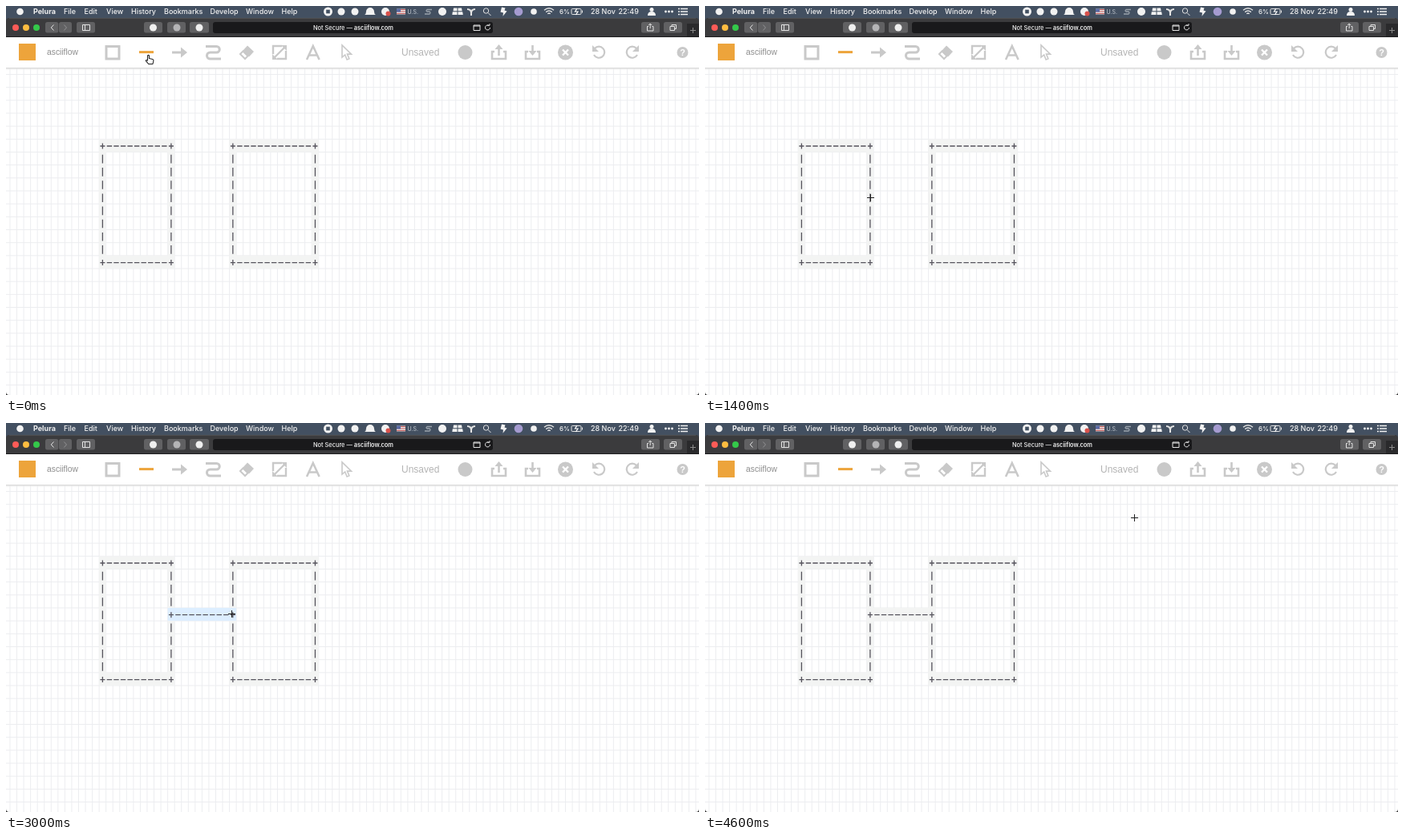
Animation, 864 px wide and 486 px high, one loop 4.8 s. Source, as an HTML page:

```html
<!DOCTYPE html>
<html lang="en">
<head>
<meta charset="utf-8">
<title>ASCII line drawing</title>
<style>
html, body { margin: 0; width: 100%; height: 100%; overflow: hidden; background: #fff; }
svg { display: block; width: 864px; height: 486px; }
.ui { font: 500 9px Inter, Roboto, sans-serif; fill: #f2f2f2; }
.page { font-family: "Liberation Sans", Arial, sans-serif; }
.icon { fill: none; stroke: #c9c9c9; stroke-width: 3; }
.solid { fill: #c9c9c9; stroke: none; }
.thin { fill: none; stroke: #e4e4e4; stroke-width: 1; }
.button { fill: #616163; }
</style>
</head>
<body>
<svg viewBox="0 0 864 486">
  <defs>
    <linearGradient id="shade" x2="0" y2="1">
      <stop stop-color="#cfcfcf"/><stop offset="1" stop-color="#fff" stop-opacity="0"/>
    </linearGradient>
  </defs>
  <rect width="864" height="486" fill="#fff"/>
  <path id="grid" stroke="#ecedf0" fill="none"/>
  <path id="cells" fill="#f3f4f3"/>
  <rect id="selection" fill="#def"/>
  <path id="glyphs" stroke="#55535c" stroke-width="1.3" fill="none"/>

  <!-- page toolbar -->
  <rect y="38" width="864" height="39" fill="#fff"/>
  <rect y="77" width="864" height="4" fill="url(#shade)"/>
  <g class="page">
    <rect x="16" y="47" width="21" height="21" fill="#eda43b"/>
    <text x="51" y="61.3" font-size="10.3" fill="#8d8d8d">asciiflow</text>
    <text x="493" y="62.3" font-size="12" fill="#b4b4b4">Unsaved</text>
  </g>
  <path d="M166 57.6h18" stroke="#eda43b" stroke-width="3"/>
  <g class="icon">
    <rect x="125" y="50.5" width="16" height="15.5"/>
    <path d="M207 58h13"/>
    <path d="M249 50.5h13.5a3.75 3.75 0 0 1 0 7.5h-8a4 4 0 0 0 0 8h13.5"/>
    <path d="M292 60l6 6l3.5-3.5l-6-6z" stroke-width="2"/>
    <path class="solid" d="M295 56l6-6.5l8 7.5l-6 6.5z"/>
    <path d="M333 60V50h11M349 56v10h-11M334 65l14-14" stroke-width="2.4"/>
    <path class="solid" d="M343 49h7v7zM332 60v7h7zM218 51.5l8 6.5l-8 6.5z"/>
    <path d="M375 67l7.8-17l7.8 17M378 61.5h10" stroke-width="2.6"/>
    <path d="M419 49v15l3.7-3l2.4 6l2.8-1.1l-2.4-5.8h5z" stroke-width="1.6"/>
    <circle class="solid" cx="572.5" cy="58" r="9"/>
    <path d="M609 57h-3v9h17v-9h-3M614.5 62v-9M651 57h-3v9h17v-9h-3M656.5 49v8" stroke-width="2.6"/>
    <path class="solid" d="M609.5 54l5-6l5 6zM651.5 56l5 6l5-6z"/>
    <circle class="solid" cx="697.5" cy="58" r="9.5"/>
    <path d="M694 54.5l7 7m0-7l-7 7" stroke="#fff" stroke-width="2.3"/>
    <path d="M734 53a7 7 0 1 1-1 8M786 53a7 7 0 1 0 1 8" stroke-width="2.2"/>
    <path class="solid" d="M731 49v8h8zM789 49v8h-8z"/>
    <circle class="solid" cx="843.5" cy="58" r="7"/>
  </g>
  <text class="page" x="843.5" y="62" font-size="11" font-weight="700" fill="#fff" text-anchor="middle">?</text>

  <!-- browser toolbar -->
  <rect width="864" height="39" fill="#435061"/>
  <path d="M0 39V19q0-4 4-4h856q4 0 4 4v20z" fill="#3b3b3d"/>
  <path d="M4 15.3h856" stroke="#59595b" stroke-width=".8"/>
  <path d="M0 38.5h864" stroke="#1f1f20"/>
  <circle cx="12" cy="27" r="4" fill="#fc5b57"/>
  <circle cx="25" cy="27" r="4" fill="#fdbc40"/>
  <circle cx="38" cy="27" r="4" fill="#34c84a"/>
  <g id="buttons" class="button"></g>
  <rect x="258" y="20" width="349" height="14" rx="3" fill="#19191b"/>
  <rect x="849" y="22" width="15" height="16" fill="#2a2a2c"/>
  <g class="thin">
    <path d="M59.5 23.5l-3.2 3.5l3.2 3.5"/>
    <path d="M72.3 23.5l3.2 3.5l-3.2 3.5" stroke="#929294"/>
    <path d="M95.5 23.5h9v7h-9zM98.5 23.5v7M583 24h8v6.5h-8zM583 25h8"/>
    <path d="M602.5 24.7a3 3 0 1 0 1 2.3M600 24.2h3v-2"/>
    <path d="M801 25.5h-1.5v5.5h7.5v-5.5h-1.5M803.2 28v-6m-2 2l2-2l2 2"/>
    <path d="M828 25.5h5.5v5h-5.5zM830 25.5v-2h5.5v5h-2"/>
    <path d="M853 30.5h7m-3.5-3.5v7" stroke="#8a8a8a"/>
  </g>
  <g fill="#efefef">
    <circle cx="183.5" cy="27" r="4.5"/>
    <circle cx="213" cy="27" r="4.5" fill="#b4b4b6"/>
    <circle cx="241" cy="27" r="4.5"/>
  </g>
  <text class="ui" x="433" y="29.8" text-anchor="middle" style="font-size:7.4px">Not Secure — <tspan font-weight="600">asciiflow.com</tspan></text>

  <!-- menu bar -->
  <circle cx="17.5" cy="7" r="4.3" fill="#f2f2f2"/>
  <g id="menu" class="ui"></g>
  <g fill="#f2f2f2">
    <circle cx="401.5" cy="7" r="5.5"/>
    <rect x="399.2" y="4.7" width="4.6" height="4.6" fill="#435061"/>
    <circle cx="418" cy="7" r="4.5"/>
    <circle cx="435" cy="7" r="4.5"/>
    <path d="M447 11q2-1 2-4a5 5 0 0 1 10 0q0 3 2 4z"/>
    <circle cx="473" cy="7" r="5"/>
    <circle cx="476.5" cy="9.5" r="3" fill="#d8514b"/>
    <circle cx="544" cy="7" r="5"/>
    <path d="M558 2.5h4.5v3.7h-5zM563.5 2.5h4.5l.7 3.7h-5.2zM556.8 7.2h5.7v3.8h-6.2zM563.5 7.2h5.7l.6 3.8h-6.3z"/>
    <path d="M618 1.5l4.5 1l-1 3l3 1l-5 6.2l.5-4.3l-3.5-1z"/>
    <circle cx="658" cy="7" r="3.8"/>
    <circle cx="805" cy="4.5" r="2.5"/>
    <path d="M800 12q0-5 5-5t5 5z"/>
    <circle cx="822.5" cy="7" r="1.4"/><circle cx="826.5" cy="7" r="1.4"/><circle cx="830.5" cy="7" r="1.4"/>
  </g>
  <circle cx="639" cy="7" r="5.3" fill="#a59bd0"/>
  <rect x="487" y="3.5" width="11" height="7" fill="#e9e3e3"/>
  <path d="M487 4.5h11m-11 2.5h11m-11 2.5h11" stroke="#c65c5c"/>
  <rect x="487" y="3.5" width="5" height="4" fill="#596aa5"/>
  <g class="thin">
    <path d="M531 4.5h-6q-2 1.3 0 2.5h3q2 1.5 0 3h-6" stroke="#9aa2ac" stroke-width="1.3"/>
    <path d="M575 4q5 0 5 5v3m0-3q0-5 5-5" stroke-width="2"/>
    <circle cx="598.5" cy="6" r="3.2"/><path d="M601 8.5l3.5 3.5"/>
    <path d="M671 5.2q6-5 12 0M673.2 7.6q3.8-3.2 7.6 0M675.3 9.7q1.7-1.4 3.4 0" stroke-width="1.4"/>
    <rect x="705" y="3.5" width="12" height="7" rx="1.2"/><path d="M718.5 5.5v3"/>
    <path d="M712 3l-2.5 4h3.5l-2.5 4" stroke="#fff" stroke-width="1.2"/>
    <path d="M838 3.5h2m1 0h9m-12 3.5h2m1 0h9m-12 3.5h2m1 0h9" stroke="#f2f2f2" stroke-width="1.3"/>
  </g>
  <path d="M0 482v4h4q-4 0-4-4zM864 482v4h-4q4 0 4-4z" fill="#333"/>

  <path id="cross" d="M-4.5 0h9M0-4.5v9" stroke="#222" fill="none"/>
  <path id="hand" d="M-2-4.5q1.3-1.2 2 0V-1l4.3 1q1.3.4 1.1 2L4.5 6H-.8L-4.2 1.8q.2-1.6 2.2-.2z" fill="#fff" stroke="#222" stroke-width="1.1" stroke-linejoin="round"/>
</svg>
<script>
const $ = id => document.getElementById(id);
const STEP = 200, LOOP = 4800;
const CELL_W = 8.55, CELL_H = 16.17, LEFT = 120.4, TOP = 175;
const LINE_START = 10, LINE_END = 19, LINE_ROW = 4;
const DRAG_FROM = 2000, RELEASE = 4000, HAND_UNTIL = 400;

// Pointer path: time, x, y
const path = [
  [0, 178, 66.5], [200, 178, 70], [400, 207, 195], [600, 219, 246], [1000, 209, 240.5],
  [1400, 206, 239.5], [2000, 206, 239.5], [2600, 267, 238], [3000, 281.5, 238.5],
  [4000, 281.5, 238.5], [4200, 304, 228], [4600, 535, 118.5]
];

const colX = c => LEFT + c * CELL_W;
const rowY = r => TOP + r * CELL_H;
const edgeX = c => colX(c - .5);
const edgeY = r => rowY(r - .5) - .6;   // glyphs sit a little below the cell centre
const pixel = v => Math.floor(v) + .5;

function pointerAt(t) {
  const i = path.findIndex(p => p[0] > t);
  if (i < 0) return path[path.length - 1].slice(1);
  const [a, b] = [path[i - 1], path[i]];
  const k = (t - a[0]) / (b[0] - a[0]);
  return [1, 2].map(n => a[n] + (b[n] - a[n]) * k);
}

function addLine(cells, c0, r0, c1, r1) {
  const n = Math.max(c1 - c0, r1 - r0), flat = r0 === r1;
  for (let i = 0; i <= n; i++) {
    const end = i === 0 || i === n;
    cells.set(`${c0 + (flat ? i : 0)},${r0 + (flat ? 0 : i)}`, end ? "+" : flat ? "-" : "|");
  }
}

function addBox(cells, left, right, bottom) {
  addLine(cells, left, 0, right, 0);
  addLine(cells, left, bottom, right, bottom);
  addLine(cells, left, 0, left, bottom);
  addLine(cells, right, 0, right, bottom);
}

const strokes = { "+": "m-3 0h6m-3-3.5v7", "-": "m-3.2 0h6.4", "|": "m0-5.3v10.6" };

function drawCells(cells) {
  let back = "", marks = "";
  for (const [key, char] of cells) {
    const [c, r] = key.split(",").map(Number);
    back += `M${edgeX(c)} ${edgeY(r)}h${CELL_W}v${CELL_H}h${-CELL_W}z`;
    marks += `M${colX(c)} ${rowY(r)}${strokes[char]}`;
  }
  $("cells").setAttribute("d", back);
  $("glyphs").setAttribute("d", marks);
}

function buildStatic() {
  let grid = "";
  for (let c = -14; edgeX(c) < 864; c++) grid += `M${edgeX(c)} 78V486`;
  for (let r = -5; edgeY(r) < 486; r++) grid += `M0 ${edgeY(r)}H864`;
  $("grid").setAttribute("d", grid);

  $("buttons").innerHTML = [[49, 16.3], [66, 16], [88, 23], [172, 23], [201, 23], [229, 24], [792, 23], [820, 23]]
    .map(([x, w]) => `<rect x="${x}" y="20" width="${w}" height="13.5" rx="2.5"/>`).join("");

  const items = [[34, "Pelura", 700], [72, "File"], [97.5, "Edit"], [125, "View"], [156, "History"],
    [197, "Bookmarks"], [254.5, "Develop"], [299, "Window"], [343.5, "Help"],
    [729, "28 Nov"], [763.5, "22:49"]];
  $("menu").innerHTML = items
    .map(([x, label, weight = 500]) => `<text x="${x}" y="10.3" font-weight="${weight}">${label}</text>`).join("") +
    `<text x="500.5" y="10" style="font-size:7px" fill="#b3bac3">U.S.</text>` +
    `<text x="690" y="10" style="font-size:8px">6%</text>`;
}

function render(time) {
  const t = Math.floor(time % LOOP / STEP) * STEP;
  const [x, y] = pointerAt(t);
  const dragging = t > DRAG_FROM && t < RELEASE;
  const cells = new Map();
  addBox(cells, 0, 10, 9);
  addBox(cells, 19, 31, 9);

  const end = t >= RELEASE ? LINE_END : Math.round((x - LEFT) / CELL_W);
  if (t > DRAG_FROM) addLine(cells, LINE_START, LINE_ROW, end, LINE_ROW);
  drawCells(cells);

  const selection = $("selection");
  selection.style.display = dragging ? "" : "none";
  if (dragging) {
    selection.setAttribute("x", edgeX(LINE_START));
    selection.setAttribute("y", edgeY(LINE_ROW));
    selection.setAttribute("width", (end - LINE_START + 1) * CELL_W);
    selection.setAttribute("height", CELL_H);
  }

  const overToolbar = t < HAND_UNTIL;
  for (const [id, shown] of [["hand", overToolbar], ["cross", !overToolbar]]) {
    $(id).style.display = shown ? "" : "none";
    $(id).setAttribute("transform", `translate(${pixel(x)} ${pixel(y)})`);
  }
}

buildStatic();
const start = performance.now();
function tick() {
  render(performance.now() - start);
  requestAnimationFrame(tick);
}
tick();
</script>
</body>
</html>
```
